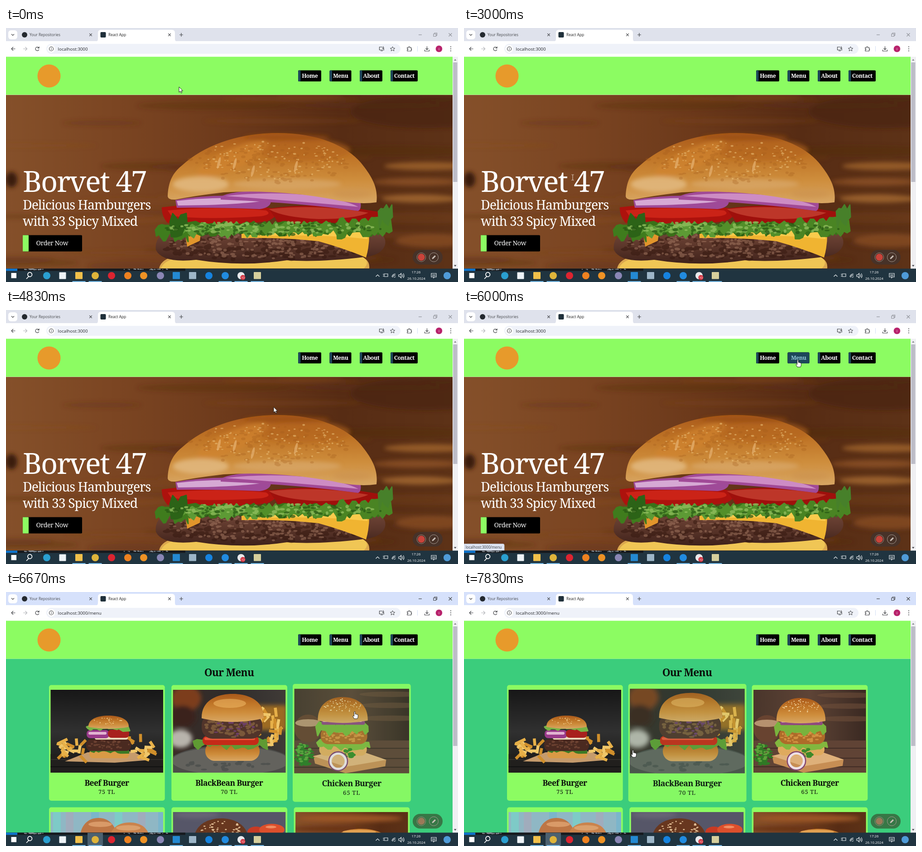
An HTML page that plays this animation: 998 by 561 pixels, repeating every 8 s.

```html
<!DOCTYPE html>
<html lang="en">
<head>
<meta charset="utf-8">
<title>Burger menu</title>
<style>
  html, body { margin: 0; width: 100%; height: 100%; overflow: hidden; background: #fff; }
  svg { display: block; width: 100vw; height: 100vh; }
  text { font-family: "Open Sans", "Noto Sans", sans-serif; white-space: pre; }
  .serif { font-family: "Noto Serif", "Liberation Serif", serif; letter-spacing: -.035em; }
  .price { letter-spacing: .05em; }
  .bold { font-weight: 700; }
  .mid { text-anchor: middle; }
  .line { fill: none; stroke: #45474b; stroke-width: 1.2; }
</style>
</head>
<body>
<svg id="stage" viewBox="0 0 998 561" xmlns="http://www.w3.org/2000/svg"></svg>
<script>
const LOOP = 8000, FPS = 6;
const GREEN = '#8cfc62', TEAL = '#1d4759';

function random(seed) {
  return () => (seed = (seed * 16807) % 2147483647) / 2147483647;
}

// ---- shape helpers ----
const rect = (x, y, w, h, fill, rx = 0, more = '') =>
  `<rect x="${x}" y="${y}" width="${w}" height="${h}" rx="${rx}" fill="${fill}" ${more}/>`;
const oval = (x, y, rx, ry, fill, more = '') =>
  `<ellipse cx="${x}" cy="${y}" rx="${rx}" ry="${ry}" fill="${fill}" ${more}/>`;
const disc = (x, y, r, fill, more) => oval(x, y, r, r, fill, more);
const path = (d, fill, more = '') => `<path d="${d}" fill="${fill}" ${more}/>`;
const line = (d, more = '') => `<path class="line" d="${d}" ${more}/>`;
const text = (x, y, size, str, fill = '#222', cls = '', more = '') =>
  `<text x="${x}" y="${y}" font-size="${size}" fill="${fill}" class="${cls}" ${more}>${str}</text>`;
const group = (id, body, more = '') => `<g id="${id}" ${more}>${body}</g>`;
const soft = body => `<g filter="url(#soft)">${body}</g>`;

const gradient = (id, vertical, ...colors) =>
  `<linearGradient id="${id}" x2="${vertical ? 0 : 1}" y2="${vertical ? 1 : 0}">` +
  colors.map((c, i) => `<stop offset="${i / (colors.length - 1)}" stop-color="${c}"/>`).join('') +
  '</linearGradient>';

function dome(x1, x2, top, base, fill, sag = 5) {
  const w = x2 - x1, m = (x1 + x2) / 2, h = base - top;
  return path(`M${x1} ${base}C${x1 - w * .01} ${base - h * .68} ${x1 + w * .22} ${top} ${m} ${top}` +
    `S${x2 + w * .01} ${base - h * .68} ${x2} ${base}Q${m} ${base + sag} ${x1} ${base}Z`, fill);
}

// A wavy strip with irregular upper and lower edges.
function frill(x1, x2, y, h, fill, seed, step) {
  const r = random(seed), upper = [], lower = [];
  for (let x = x1; x <= x2; x += step) {
    upper.push(`${x} ${(y - h * r() * .5).toFixed(1)}`);
    lower.unshift(`${(x + step * r() * .6).toFixed(1)} ${(y + h * (.25 + r() * .75)).toFixed(1)}`);
  }
  return path(`M${upper.join('L')}L${lower.join('L')}Z`, fill,
    `stroke="${fill}" stroke-width="${step * .45}" stroke-linejoin="round"`);
}

// Small spots scattered inside an ellipse.
function specks(n, x, y, rx, ry, size, fill, seed, opacity = 1) {
  const r = random(seed);
  let out = '';
  for (let i = 0; i < n; i++) {
    const a = r() * 6.283, d = Math.sqrt(r());
    out += oval((x + rx * d * Math.cos(a)).toFixed(1), (y + ry * d * Math.sin(a)).toFixed(1),
      (size * (.6 + r())).toFixed(1), (size * (.4 + r() * .5)).toFixed(1), fill);
  }
  return `<g opacity="${opacity}">${out}</g>`;
}

function fries(x, y, w, h, n, seed) {
  const r = random(seed);
  let out = '';
  for (let i = 0; i < n; i++) {
    const a = x + w * r(), b = y + h * r(), t = r() * 6.283, l = 14 + r() * 9;
    out += `<path d="M${a} ${b}l${l * Math.cos(t)} ${l * Math.sin(t)}" stroke="${['#e7b048', '#d08f2b', '#f0c76a'][i % 3]}" stroke-width="6.5"/>`;
  }
  return out;
}

// ---- browser frame ----
function browser() {
  const cross = (x, y, r) => `M${x - r} ${y - r}l${2 * r} ${2 * r}M${x + r} ${y - r}l${-2 * r} ${2 * r}`;
  return rect(0, 0, 998, 30, '#dfe2ec', 0, 'id="strip"') +
    rect(5, 5, 20, 20, '#fff', 6) + line('M12 13.5l3 3 3-3') +
    disc(41, 15, 6, '#24292f') + text(52, 18.3, 8.3, 'Your Repositories', '#47494d') +
    line(cross(187, 15, 2.8)) +
    path('M197 30q6 0 6-6V11q0-7 7-7H366q7 0 7 7v13q0 6 6 6z', '#fff') +
    rect(208.5, 9, 12, 12, '#20303a', 2) + text(226, 18.3, 8.4, 'React App') +
    line(cross(361, 15, 2.8)) + line('M387 11v8M383 15h8') +
    group('controls', line('M911 15h7') + line('M944 13h5.5v5.5H944zM946 13v-2h5.5v5.5h-2') + line(cross(981, 15, 3.5))) +
    rect(0, 29, 998, 35, '#fff') +
    line('M20.5 46h-8.5M16 42l-4 4 4 4') +
    line('M38 46h8M42.5 42l4 4-4 4', 'style="stroke:#b4b6ba"') +
    line('M72.5 44a4 4 0 1 0 .3 3.5M73 41v3.4h-3.4') +
    rect(89, 35, 782, 22, '#eff2f9', 11) + disc(100, 46, 8.5, '#fff') +
    `<circle class="line" cx="100" cy="46" r="4.5"/>` + line('M100 45.3v3M100 43.2v1') +
    text(114.5, 49.5, 9.8, 'localhost:3000', '#24262a', '', 'id="url"') +
    line('M831 42h-6.5v6.5h10V47M827 50.5h5M833 40.5v5.5M831 44l2 2 2-2') +
    path('M853.5 41l1.5 3.4 3.7.3-2.8 2.4.9 3.6-3.3-2-3.2 2 .8-3.6-2.7-2.4 3.7-.3z', 'none', 'stroke="#45474b"') +
    line('M886 43h3v-1.5h2.5V43h3v3h1v2.4h-1V51H886v-3h1.5v-2H886z') +
    rect(908, 40, 1, 12, '#d3def5') +
    line('M929.5 40.5v7M926.5 45l3 3 3-3M924.5 48v3h10v-3') +
    disc(956, 46, 7.3, '#b8236c') + text(956, 49, 8, 'i', '#fff', 'mid') +
    [41.5, 46, 50.5].map(y => disc(982, y, 1.1, '#45474b')).join('');
}

const NAV = [['Home', 645, 51], ['Menu', 714.5, 48], ['About', 781, 50], ['Contact', 849, 60]];

function header() {
  return rect(0, 63.5, 986, 84, GREEN) + disc(95, 106, 25.5, '#e79a2b') +
    NAV.map(([name, x, w]) =>
      rect(x, 93.5, w, 24.5, '#000', 2) +
      rect(x, 93.5, 5.5, 24.5, TEAL, 2, `id="bar${name}"`) +
      text(x + w / 2 + .3, 110, 12.4, name, '#fff', 'serif bold mid', `id="nav${name}"`)).join('');
}

// ---- home page ----
function wood() {
  const r = random(91);
  let grain = '';
  for (let i = 0; i < 36; i++) {
    grain += oval(r() * 986, 150 + r() * 380, 60 + r() * 130, 4 + r() * 8,
      ['#4f2811', '#8a5027', '#5f3214', '#824a22'][i % 4], 'opacity=".3"');
  }
  return rect(0, 147.5, 986, 385, 'url(#wood)') + soft(grain +
    oval(930, 185, 170, 36, '#4a2611', 'opacity=".7"') +
    oval(930, 305, 95, 9, '#a4672f', 'opacity=".75"') + oval(900, 340, 90, 9, '#95572a', 'opacity=".6"') +
    oval(915, 377, 85, 9, '#a86c33', 'opacity=".75"') + oval(940, 470, 80, 14, '#94562a', 'opacity=".6"') +
    oval(12, 335, 13, 17, '#3a1f10'));
}

function hero() {
  const lower =
    path('M338 531Q343 508 380 504L770 502Q805 507 802 531Z', '#dba84e') +
    path('M342 531Q350 508 400 507Q500 521 620 510L780 502Q808 514 790 531Z', '#f0c655') +
    path('M331 490Q326 452 380 444Q580 436 800 446Q842 452 837 478Q831 502 790 506Q690 518 620 513Q520 528 420 512Q345 520 331 490Z', 'url(#beef)') +
    specks(170, 572, 482, 228, 30, 6, '#35180f', 17, .5) + specks(190, 572, 480, 226, 29, 3.6, '#a67a63', 31, .5) +
    path('M395 452L430 456L428 470L400 483Z', '#e2952b') +
    path('M520 454Q690 440 802 448Q803 480 795 507Q750 488 690 471Q610 462 520 464Z', '#f0b431') +
    path('M540 455Q690 444 800 449L798 466Q690 454 540 460Z', '#f9cb4c');
  const tomatoes =
    path('M344 396Q450 382 586 398Q608 416 575 427Q440 442 356 430Q343 414 344 396Z', '#ad120d') +
    path('M357 403Q460 393 574 403Q590 412 560 416Q440 424 365 415Z', '#cb2317') +
    path('M580 399Q690 382 822 406Q829 422 808 430Q690 440 600 428Z', '#9f100c') +
    path('M580 400Q690 388 800 408Q770 422 690 422Q610 418 580 400Z', '#bd3629');
  const onions =
    path('M374 380Q470 363 584 376Q590 396 560 400Q460 396 377 397Z', '#9f4a98') +
    path('M377 382Q470 370 580 380Q520 391 380 392Z', '#d6a9d4') +
    path('M474 373Q500 356 610 360Q720 365 783 386Q785 402 777 404Q650 386 474 379Z', '#a14a97') +
    path('M484 371Q580 360 680 370Q750 380 778 395Q640 382 484 371Z', '#cd8cc4');
  const lettuce =
    frill(355, 840, 438, 22, '#3a7119', 7, 8) + frill(330, 405, 446, 26, '#3f7c1d', 19, 7) +
    frill(390, 560, 440, 24, '#5d9a35', 23, 7) + frill(560, 740, 438, 22, '#528f2a', 47, 7) +
    frill(730, 850, 434, 32, '#4a8423', 41, 7) + frill(822, 854, 405, 44, '#47802a', 5, 6) +
    frill(362, 402, 428, 38, '#2c6317', 13, 6) +
    specks(90, 590, 440, 240, 13, 4.5, '#8fbd5c', 29, .8) + specks(80, 590, 444, 240, 14, 4, '#265613', 53, .7);
  const bun =
    path('M357 372C358 340 368 320 388 304C440 256 520 231 600 232C688 232 752 260 784 298C808 328 822 352 818 385Q775 391 720 378Q600 356 480 363Q420 370 374 379Q358 380 357 372Z', 'url(#bun)') +
    soft(oval(500, 290, 85, 22, '#d0842f', 'opacity=".7" transform="rotate(-24 500 290)"') +
      oval(430, 345, 62, 17, '#e2b981', 'opacity=".85"') + oval(620, 345, 120, 12, '#d8a566', 'opacity=".8"') +
      oval(660, 270, 100, 24, '#b4661d', 'opacity=".6"') + oval(620, 242, 95, 7, '#984c15', 'opacity=".7"') +
      oval(765, 366, 42, 9, '#cd9450', 'opacity=".8"')) +
    specks(120, 580, 300, 180, 44, 4, '#a35a1b', 83, .28) + specks(110, 585, 290, 160, 44, 2.2, '#edc47d', 77, .55) +
    [[470, 298], [505, 300], [545, 316], [640, 306]].map(([x, y]) =>
      oval(x, y, 3, 13, '#e6b272', `opacity=".7" transform="rotate(14 ${x} ${y})"`)).join('');
  return `<g clip-path="url(#page)">${wood() + lower + tomatoes + onions + lettuce + bun}</g>` +
    text(37, 362, 64.5, 'Borvet 47', '#fff', 'serif') +
    text(37, 401, 28.4, 'Delicious Hamburgers', '#fff', 'serif') +
    text(37, 437, 28.4, 'with 33 Spicy Mixed', '#fff', 'serif') +
    rect(37, 457.5, 131, 36, '#000', 2) + rect(37, 457.5, 13, 36, GREEN, 1, 'id="orderBar"') +
    text(66.5, 480, 14.2, 'Order Now', '#fff', 'serif');
}

// ---- menu page ----
const CARDS = [
  ['Beef Burger', 75, 95, 205.5], ['BlackBean Burger', 70, 365.3, 205.5], ['Chicken Burger', 65, 635.6, 205.5],
  ['', 0, 95, 475.5], ['', 0, 365.3, 475.5], ['', 0, 635.6, 475.5]
];

const PHOTOS = [
  () => rect(98, 216, 250, 184, 'url(#night)') + rect(98, 358, 250, 42, '#211f1d') +
    rect(98, 369, 250, 2, '#34302c') + rect(98, 385, 250, 2, '#111') +
    path('M130 374L180 354L280 352L317 371L240 377Z', '#c59b6c') +
    fries(112, 333, 58, 30, 19, 8) + fries(268, 330, 50, 34, 17, 55) +
    dome(186, 270, 367, 350, '#d99c4a', 8) + rect(184, 348, 88, 19, '#d99a45', 8) +
    frill(186, 274, 348, 8, '#3b7a25', 3, 6) + rect(177, 325, 99, 26, '#4a2a20', 11) +
    specks(45, 226, 337, 45, 10, 2.3, '#7b4c39', 9, .7) +
    rect(196, 317, 73, 9, '#e9d9bb', 4) + rect(178, 305, 50, 18, '#9a3b8b', 8) + rect(182, 309, 40, 6, '#e2b4d2', 3) +
    rect(225, 304, 47, 18, '#a8211d', 8) + frill(178, 270, 298, 10, '#78b245', 12, 7) +
    dome(182, 271, 273, 298, 'url(#bun)', 8) + specks(28, 227, 284, 32, 8, 1.1, '#f6d796', 21),
  () => rect(366, 214, 254, 187, 'url(#dusk)') +
    soft(oval(398, 235, 33, 28, '#7c3e1e') + oval(390, 275, 29, 24, '#3b211a') + oval(385, 324, 26, 20, '#b8b4ac') + rect(550, 250, 70, 55, '#9c6a23')) +
    fries(552, 268, 55, 70, 30, 14) + oval(496, 381, 140, 43, '#4c4c49') + oval(496, 373, 130, 31, '#63625d') +
    specks(20, 490, 382, 90, 14, 5, '#3e4443', 2, .5) +
    rect(440, 330, 120, 43, 'url(#bun)', 21) + frill(414, 580, 330, 18, '#5f9a33', 27, 8) +
    rect(434, 318, 124, 20, '#c52a18', 9) + rect(438, 321, 112, 6, '#e6563a', 3) +
    rect(432, 270, 134, 54, '#51342a', 24) +
    specks(80, 499, 298, 60, 23, 3.8, '#85623f', 33, .8) + specks(26, 499, 298, 58, 22, 3, '#6d3f68', 43) +
    dome(432, 569, 225, 279, 'url(#bun)', 16) + oval(494, 246, 36, 10, '#edb462', 'opacity=".6"'),
  () => rect(636, 213, 255, 188, 'url(#barn)') +
    [228, 252, 280].map(y => oval(850, y, 70, 6, '#74533c', 'opacity=".5"')).join('') +
    rect(636, 328, 255, 73, '#604335') + [344, 366, 385].map(y => rect(636, y, 255, 2, '#402c25')).join('') +
    oval(669, 302, 30, 30, '#684330') + oval(669, 290, 28, 8, '#b6916f') +
    path('M680 362L760 343L838 370L836 384L750 399L684 378Z', '#c78e54') + path('M680 362L760 343L838 370L750 385Z', '#deb07a') +
    rect(693, 333, 103, 28, '#dfaa5e', 13) + frill(688, 804, 333, 16, '#82b73e', 15, 7) +
    rect(696, 300, 101, 36, '#ae6b29', 16) + specks(70, 746, 318, 46, 15, 2.7, '#db9b47', 11, .8) +
    frill(686, 804, 298, 20, '#79b33d', 37, 7) + rect(698, 285, 94, 9, '#8f4a7e', 4) + rect(701, 285, 84, 3, '#e6cdda', 2) +
    dome(690, 798, 234, 285, 'url(#bun)', 10) + specks(55, 744, 253, 40, 15, 1.2, '#fae2ae', 61) +
    specks(65, 658, 360, 20, 23, 4, '#2f7925', 25) + specks(28, 658, 354, 18, 20, 3, '#5ca13a', 35) +
    specks(20, 757, 356, 10, 10, 4, '#3d8929', 65) +
    `<circle cx="734" cy="373" r="18" fill="none" stroke="#81436e" stroke-width="7"/><circle cx="734" cy="373" r="16.5" fill="none" stroke="#eee0e5" stroke-width="5"/>`,
  () => rect(98, 486, 250, 50, '#8fb7c4') +
    [104, 132, 188, 240, 291, 336].map((x, i) => rect(x, 486, 17, 50, ['#79d1c8', '#a6a9ba', '#75b5ce'][i % 3], 0, 'opacity=".75"')).join('') +
    dome(163, 245, 499, 550, '#bd7645') + dome(229, 317, 509, 550, '#ca834c') +
    oval(208, 513, 26, 6, '#d99a68') + oval(270, 521, 27, 6, '#dba06c'),
  () => rect(368, 486, 250, 50, '#565668') + soft(oval(420, 492, 50, 8, '#676576')) +
    dome(414, 536, 500, 555, '#68371f') + specks(48, 474, 524, 47, 19, 2, '#dfbb92', 73) +
    oval(552, 530, 19, 12, '#c83b24') + oval(587, 525, 28, 13, '#dd4f2c') + oval(585, 519, 12, 3, '#f18d62'),
  () => rect(638, 486, 250, 50, 'url(#wood)') + soft(oval(760, 500, 115, 8, '#9c5727') + oval(700, 523, 80, 5, '#673316')) +
    dome(720, 847, 523, 561, '#c97b2c') + oval(780, 530, 37, 5, '#e2a152')
];

function menu() {
  return rect(0, 147.5, 986, 385, '#3bcd7c') +
    text(492.5, 186, 22.8, 'Our Menu', '#0b0f0b', 'serif bold mid') +
    CARDS.map(([name, price, x, y], i) => {
      const m = x + 127.5;
      return `<clipPath id="shot${i}">${rect(x + 3.5, y + 10.5, 248.5, 183, '#000')}</clipPath>` +
        group('card' + i, rect(x, y, 255.7, 255.5, GREEN, 5) +
          group('photo' + i, PHOTOS[i](), `clip-path="url(#shot${i})"`) +
          (name && text(m, y + 222, 17.5, name, '#0b0f0b', 'serif bold mid') +
            text(m, y + 240.3, 13, price + ' TL', '#0b0f0b', 'serif price mid')));
    }).join('');
}

// ---- desktop ----
function taskbar() {
  const icons = [[90, '#2a9fd0'], [161, '#f2c04a', 1], [197, '#dfb43a'], [233, '#dc2430'], [269, '#ee8120'],
    [304, '#ee9225'], [341, '#8a86b5'], [376, '#2489d2', 1], [412, '#9db6c8', 1], [448, '#1683df'],
    [484, '#218be0'], [519, '#e9e9ec'], [555, '#d6cf9c', 1], [974, '#4f9bd8']];
  return rect(0, 531.5, 998, 30, '#203440') +
    rect(0, 531.5, 396, 5, '#16191d') + rect(0, 531.5, 25, 5, '#0f76cf') +
    specks(28, 60, 533, 26, 1, 1.5, '#8b939b', 5) + specks(32, 310, 533, 52, 1, 1.4, '#8b939b', 6) +
    rect(180, 532, 34, 29, '#4c6170', 0, 'id="active"') +
    rect(11.5, 541, 11.5, 11.5, '#fff') +
    line('M56 548a4.8 4.8 0 1 1 .1-.1M50 549l-5 5', 'style="stroke:#fff;stroke-width:1.7"') +
    rect(117.5, 539.5, 15, 15, '#eef3f7', 1) +
    icons.map(([x, c, square]) => square ? rect(x - 8, 539, 16, 15.5, c, 1) : disc(x, 547, 8, c)).join('') +
    disc(523, 551, 5.5, '#d32f3c') + text(523, 553.7, 7, '10', '#fff', 'mid') +
    [161, 197, 376, 484, 519, 555].map(x => rect(x - 14.5, 559, 29, 2, '#7bbde9')).join('') +
    ['M816.5 549l4-4 4 4', 'M832 544h2m-2 4h2M835 543h8v6h-8z', 'M852 550a8 8 0 0 1 8-7M854 551a5 5 0 0 1 6-5M857 551l3-2',
      'M867 545h2.5l3-3v10l-3-3H867zM875 544q2 3 0 6M877 542q4 5 0 10', 'M939 542h11v8h-4l-2 2v-2h-5zM941 545h7M941 547.5h7']
      .map(d => line(d, 'style="stroke:#e8edf0"')).join('') +
    text(905.5, 542.3, 7.9, '17:26', '#fff', 'mid') + text(906, 555.8, 7.8, '26.10.2024', '#fff', 'mid');
}

function overlays() {
  return rect(986, 63.5, 12, 468, '#f0f0f3') + rect(987.2, 76, 9.3, 264, '#bdbdc8') +
    path('M989 72l2.8-3.4 2.8 3.4z', '#85858c') + path('M989 523.5l2.8 3.4 2.8-3.4z', '#45454a') +
    rect(898, 490, 66, 32.5, '#40332f', 16, 'id="panel" opacity=".75"') +
    `<circle cx="917" cy="506.3" r="9.8" fill="none" stroke="#9a877e"/>` +
    disc(917, 506.3, 7.8, '#c9433a', 'id="rec"') +
    `<circle cx="944.5" cy="506.3" r="10" fill="none" stroke="#a79a92"/>` +
    path('M940.5 510.5l.8-3 5.5-5.5 2.2 2.2-5.5 5.5z', '#c9beb5') +
    group('bubble', path('M0 516.5H86q3 0 3 3V531.5H0z', '#dee4f2', 'stroke="#b9c0cf" stroke-width=".7"') +
      text(3.5, 527.3, 8.15, 'localhost:3000/menu', '#3c4045'));
}

const POINTERS = {
  arrow: path('M0 0V12L2.8 9.5L4.7 13.7L6.6 12.8L4.7 8.8H8.5Z', '#fff', 'stroke="#111" stroke-width=".9"'),
  beam: path('M-2.5 -6H-.6L0 -5.4L.6 -6H2.5M0 -5.4V5.4M-2.5 6H-.6L0 5.4L.6 6H2.5', 'none', 'stroke="#e8dccf"'),
  hand: path('M-1.3 1Q0-.9 1.3 1V6Q3 4.9 3.6 6.4Q5.4 5.5 5.8 7Q7.4 6.5 7.4 8.2V12Q7 14 6 16H-1Q-2.5 13-4.2 10.8Q-4.2 8.6-1.3 10.3Z', '#fff', 'stroke="#111" stroke-width=".9"')
};

document.getElementById('stage').innerHTML =
  '<defs>' +
  gradient('wood', false, '#85502a', '#7b4522', '#6d3a1b', '#572c14', '#5d3217') +
  gradient('bun', true, '#a9591b', '#bf7426', '#ce8d3c', '#d8a663') +
  gradient('beef', true, '#75493a', '#5d372b', '#3f221b') +
  gradient('night', true, '#171717', '#303030', '#151413') +
  gradient('dusk', false, '#3b2d27', '#2e2b2a', '#403b37') +
  gradient('barn', false, '#49352b', '#5e4436', '#392821') +
  '<filter id="soft" x="-30%" y="-60%" width="160%" height="220%"><feGaussianBlur stdDeviation="5"/></filter>' +
  `<clipPath id="page">${rect(0, 147.5, 986, 385, '#000')}</clipPath></defs>` +
  browser() + group('home', hero()) + group('menu', menu()) + header() + overlays() + taskbar() +
  Object.keys(POINTERS).map(k => group(k, POINTERS[k])).join('');

// ---- motion ----
// time, x, y
const PATH = [
  [0, 382, 130], [2500, 382, 130], [2670, 360, 160], [3000, 240, 330], [3330, 130, 470], [3500, 115, 478],
  [3670, 160, 465], [3830, 226, 434], [4330, 420, 330], [4830, 590, 215], [5170, 690, 140], [5500, 737, 110],
  [6170, 737, 110], [6330, 745, 150], [6670, 770, 265], [7000, 745, 300], [7170, 690, 285], [7330, 630, 263],
  [7500, 555, 290], [7670, 450, 330], [7830, 373, 349], [8000, 373, 349]
];
const CLICK = 6165, LOADED = 6325;

function pointer(t) {
  const i = Math.max(1, PATH.findIndex(p => p[0] >= t));
  const [t0, x0, y0] = PATH[i - 1], [t1, x1, y1] = PATH[i];
  const k = (t - t0) / (t1 - t0);
  return [x0 + (x1 - x0) * k, y0 + (y1 - y0) * k];
}

const inside = ([x, y], l, t, w, h) => x >= l && x <= l + w && y >= t && y <= t + h;

function target(t) {
  const p = pointer(t);
  const link = NAV.find(([, x, w]) => inside(p, x, 93, w, 25));
  if (link) return link[0];
  if (t < CLICK) {
    if (inside(p, 37, 457, 131, 37)) return 'order';
    return inside(p, 37, 310, 290, 135) ? 'text' : '';
  }
  const i = CARDS.findIndex(([, , x, y]) => inside(p, x, y, 256, 256));
  return i < 0 ? '' : 'card' + i;
}

const $ = id => document.getElementById(id);
const set = (id, name, value) => $(id).setAttribute(name, value);
const show = (id, on) => set(id, 'visibility', on ? 'visible' : 'hidden');

function draw(t) {
  // Hover effects fade one step after the pointer has left.
  const now = target(t), recent = [now, target(Math.max(0, t - 1000 / FPS))];
  const onMenu = t >= CLICK;
  set('home', 'display', onMenu ? 'none' : 'inline');
  set('menu', 'display', onMenu ? 'inline' : 'none');
  $('url').textContent = 'localhost:3000' + (onMenu ? '/menu' : '');
  set('strip', 'fill', onMenu ? '#d6e1fb' : '#dfe2ec');
  set('controls', 'opacity', onMenu ? 1 : .5);
  set('panel', 'fill', onMenu ? '#365b35' : '#40332f');
  set('rec', 'fill', onMenu ? '#9b7959' : '#c9433a');
  show('active', onMenu);
  show('photo4', t >= LOADED);
  show('photo5', t >= LOADED);

  set('orderBar', 'width', recent.includes('order') ? 131 : 13);
  show('bubble', recent.includes('order') || recent.includes('Menu'));
  for (const [name, , w] of NAV) {
    set('bar' + name, 'width', now === name ? w : 5.5);
    set('nav' + name, 'fill', now === name ? '#8fc6d5' : '#fff');
  }
  CARDS.forEach(([, , x, y], i) => {
    const hot = recent.includes('card' + i), cx = x + 128, cy = y + 128;
    set('card' + i, 'transform', `translate(${cx} ${cy}) scale(${hot ? 1.02 : 1}) translate(${-cx} ${-cy})`);
    set('card' + i, 'opacity', hot ? .92 : 1);
  });

  const shape = now === 'text' ? 'beam' : now ? 'hand' : 'arrow';
  for (const k in POINTERS) show(k, k === shape);
  set(shape, 'transform', `translate(${pointer(t).map(v => v.toFixed(1)).join(' ')})`);
}

const start = performance.now();
function tick() {
  const t = (performance.now() - start) % LOOP;
  draw(Math.min(LOOP, Math.floor((t + 4) * FPS / 1000) * 1000 / FPS));
  requestAnimationFrame(tick);
}
tick();
</script>
</body>
</html>
```
